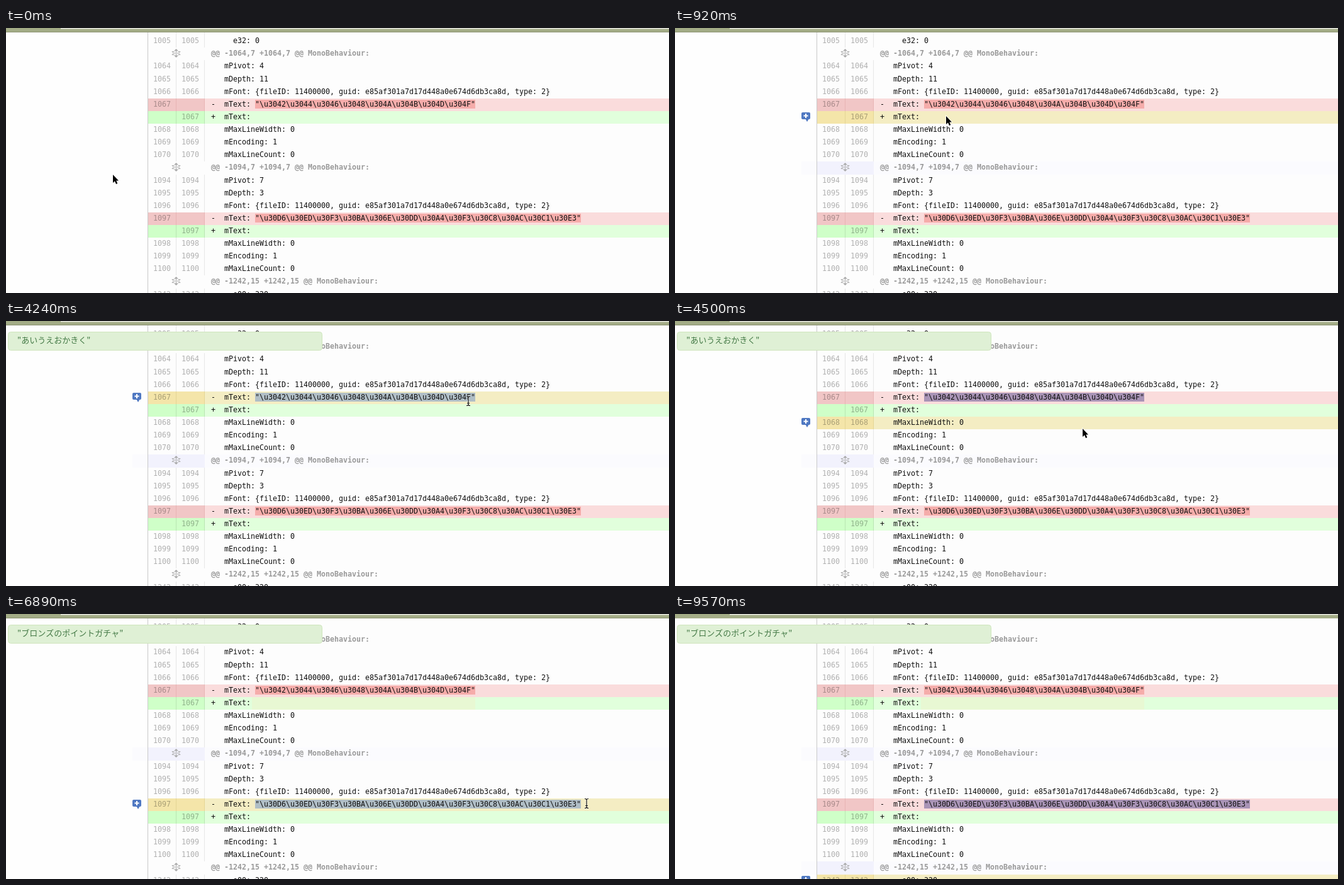
These frames come from a looping animation (1054x421 px, 9660 ms). An HTML page with a canvas:

```html
<!DOCTYPE html>
<html lang="en">
<head>
<meta charset="utf-8">
<title>Escaped text in a diff</title>
<style>
  html, body { margin: 0; width: 100%; height: 100%; overflow: hidden; background: #fdfdfd; }
  canvas { display: block; }
</style>
</head>
<body>
<canvas id="stage" width="1054" height="421"></canvas>
<script>
const ctx = document.getElementById('stage').getContext('2d');
const LOOP = 9660, WIDTH = 1054, HEIGHT = 421;
const CHAR = 7, PITCH = 20.12, FIRST_TOP = 11.2;
const CODE_X = 326, QUOTE_X = 396;
const MONO = '11.63px "DejaVu Sans Mono", monospace';
const FONT_LINE = 'mFont: {fileID: 11400000, guid: e85af301a7d17d448a0e674d6db3ca8d, type: 2}';

const escapeAll = codes => '"' + codes.split(' ').map(code => '\\u' + code).join('') + '"';
const line = (number, text, indent = 3) => ({ kind: 'same', number, text: ' '.repeat(indent) + text });
const hunk = (range, tintAt = Infinity) => ({ kind: 'hunk', text: `@@ ${range} @@ MonoBehaviour:`, tintAt });

// Seven lines of context around one changed text property
const block = (number, pivot, depth, codes) => [
  line(number, 'mPivot: ' + pivot),
  line(number + 1, 'mDepth: ' + depth),
  line(number + 2, FONT_LINE),
  { kind: 'del', number: number + 3, text: '-  mText: ' + escapeAll(codes) },
  { kind: 'add', number: number + 3, text: '+  mText:' },
  line(number + 4, 'mMaxLineWidth: 0'),
  line(number + 5, 'mEncoding: 1'),
  line(number + 6, 'mMaxLineCount: 0')
];

const rows = [
  line(1005, 'e32: 0', 5),
  hunk('-1064,7 +1064,7'),
  ...block(1064, 4, 11, '3042 3044 3046 3048 304A 304B 304D 304F'),
  hunk('-1094,7 +1094,7', 470),
  ...block(1094, 7, 3, '30D6 30ED 30F3 30BA 306E 30DD 30A4 30F3 30C8 30AC 30C1 30E3'),
  hunk('-1242,15 +1242,15', 8850),
  line(1242, 'e00: 320', 5)
];

const palette = {
  del: { gutter: '#f1c6c6', code: '#fadcdc', rule: '#e8b4b4' },
  add: { gutter: '#cfffc8', code: '#e1ffdc', rule: '#b9e6b2' },
  hover: { gutter: '#f4e5a9', code: '#f4edc3', rule: '#e4d595' },
  same: { gutter: '#fdfdfd', code: '#fdfdfd', rule: '#e6e6e6' }
};

// Pointer moves: start, time of last step, step count, points as [step, x, y]
const moves = [
  [120, 470, 5, [[1, 240, 294], [3, 375, 262], [5, 435, 225]]],
  [650, 1280, 8, [[4, 431, 140], [8, 396, 121]]],
  [1640, 2450, 10, [[2, 520, 121], [4, 632, 121], [6, 664, 120], [10, 741, 121]]],
  [2630, 2720, 2, [[2, 745, 121]]],
  [4240, 5130, 11, [[1, 735, 127], [5, 560, 215], [9, 404, 300], [11, 398, 301]]],
  [5210, 5210, 1, [[1, 394, 301]]],
  [5390, 6350, 12, [[3, 560, 302], [7, 800, 302], [11, 915, 301], [12, 923, 301]]],
  [8600, 9030, 6, [[1, 915, 310], [6, 830, 425]]]
];

const selections = [
  { row: 5, start: 1640, frozen: 2800, end: 5390 },
  { row: 14, start: 5390, frozen: 6500, end: LOOP }
];

function pointerAt(t) {
  let pos = [170, 233];
  for (const [start, end, count, points] of moves) {
    if (t < start) break;
    const interval = (end - start) / (count - 1) || 1;
    const step = Math.min(count, Math.floor((t - start) / interval + 0.05) + 1);
    let from = [0, ...pos];
    for (const to of points) {
      const p = Math.min(1, (step - from[0]) / (to[0] - from[0]));
      pos = [1, 2].map(i => from[i] + (to[i] - from[i]) * p);
      if (step <= to[0]) break;
      from = to;
    }
  }
  return pos.map(Math.round);
}

const rowTop = i => Math.round(FIRST_TOP + PITCH * i);

function rect(color, x, y, w, h) {
  ctx.fillStyle = color;
  ctx.fillRect(x, y, w, h);
}

function label(text, x, y, color, font = MONO) {
  ctx.font = font;
  ctx.fillStyle = color;
  ctx.fillText(text, x, y);
}

function stroke(path, color, width) {
  ctx.strokeStyle = color;
  ctx.lineWidth = width;
  ctx.stroke(new Path2D(path));
}

function at(x, y, draw) {
  ctx.save();
  ctx.translate(x, y);
  draw();
  ctx.restore();
}

function drawUnfold() {
  ctx.fillStyle = '#aaa';
  ctx.fill(new Path2D('M0-7 3.5-3.5H-3.5Z M0 7 3.5 3.5H-3.5Z'));
  stroke('M0-4V-1 M0 4V1 M-3-2.5H-6.5L-4 0-6.5 2.5H-3 M3-2.5H6.5L4 0 6.5 2.5H3 M-4 0H4', '#aaa', 1);
}

function drawCommentButton() {
  ctx.fillStyle = '#4f78c2';
  ctx.beginPath();
  ctx.roundRect(-7, -7, 14, 11, 2);
  ctx.fill();
  ctx.fill(new Path2D('M-1 3H5L2 8Z'));
  stroke('M0-5V2 M-3.5-1.5H3.5', '#fff', 2);
}

function drawArrow() {
  const arrow = 'M0 0V13L3 10.2 5 15 7.3 14 5.3 9.5H9Z';
  stroke(arrow, '#fff', 1.5);
  ctx.fillStyle = '#000';
  ctx.fill(new Path2D(arrow));
}

function drawBeam() {
  const beam = 'M-3-7.5Q0-7.5 0-5.5Q0-7.5 3-7.5 M0-6V6 M-3 7.5Q0 7.5 0 5.5Q0 7.5 3 7.5 M-2 3.5H2';
  stroke(beam, 'rgba(255,255,255,.55)', 3);
  stroke(beam, '#111', 1.2);
}

function drawSelection(i, t, hovered) {
  const top = rowTop(i) + 2, height = 14;
  const length = rows[i].text.length - 10;
  if (!hovered) rect('#f5acaa', QUOTE_X, top, length * CHAR, height);
  const selection = selections.find(s => s.row === i && t >= s.start && t < s.end);
  if (!selection) return;
  // The highlight trails the pointer by one step
  const x = pointerAt(Math.min(t, selection.frozen) - 90)[0];
  const chars = Math.max(0, Math.min(length, Math.round((x - QUOTE_X) / CHAR)));
  rect(hovered ? '#b0bec6' : '#a994b6', QUOTE_X, top, chars * CHAR, height);
}

function drawRow(row, i, t, hovered) {
  const top = rowTop(i), height = rowTop(i + 1) - top, baseline = top + 13;
  if (row.kind === 'hunk') {
    if (t >= row.tintAt) {
      rect('#fbfbfe', 201, top, WIDTH - 201, height);
      rect('#f2f2fd', 226, top, 90, height);
    }
    at(270.5, top + 9, drawUnfold);
    label(row.text, CODE_X, baseline, '#999', 'bold ' + MONO);
  } else {
    const colors = palette[hovered ? 'hover' : row.kind];
    rect(colors.gutter, 226, top, 90, height);
    rect(colors.code, 316, top, WIDTH - 316, height);
    rect(colors.rule, 270, top, 1, height);
    rect(colors.rule, 315, top, 1, height);
    if (i === 6 && t >= 5390 && !hovered) rect('#e8f8d3', 391, top, 355, height);
    if (row.kind === 'del') drawSelection(i, t, hovered);
    if (row.kind !== 'add') label(row.number, 234, baseline, 'rgba(0,0,0,.3)');
    if (row.kind !== 'del') label(row.number, 279, baseline, 'rgba(0,0,0,.3)');
    label(row.text, CODE_X, baseline, '#111');
    if (hovered) at(208, top + 9, drawCommentButton);
  }
  rect('#c9c9c9', 225, top, 1, height);
}

function drawHeader(t) {
  rect('#a3ac86', 0, 0, WIDTH, 6);
  rect('#eceee2', 87, 0, WIDTH - 87, 1);
  rect('#c8ccb8', 87, 1, WIDTH - 87, 1);
  rect(t >= 9570 ? '#a9b18f' : '#8d9474', 0, 6, WIDTH, 1);
}

function drawPopup(t) {
  if (t < 3070) return;
  ctx.beginPath();
  ctx.roundRect(3.5, 17.5, 499, 29, 4);
  ctx.fillStyle = '#dff0d5';
  ctx.fill();
  ctx.strokeStyle = '#cfe5bd';
  ctx.lineWidth = 1;
  ctx.stroke();
  const text = t < 6890 ? '"あいうえおかきく"' : '"ブロンズのポイントガチャ"';
  label(text, 18, 35, '#457a47', '500 13px "Noto Sans CJK JP", "Noto Sans CJK", sans-serif');
}

function draw(t) {
  const [x, y] = pointerAt(t);
  const current = x >= 226 ? Math.floor((y - FIRST_TOP) / PITCH) : -1;
  rect('#fefefe', 0, 0, WIDTH, HEIGHT);
  rect('#fdfdfd', 226, 0, WIDTH - 226, HEIGHT);
  rect('#c9c9c9', 225, 7, 1, 5);
  rect('#e6e6e6', 270, 7, 1, 5);
  rect('#e6e6e6', 315, 7, 1, 5);
  rows.forEach((row, i) => drawRow(row, i, t, i === current));
  drawHeader(t);
  drawPopup(t);
  const row = rows[current];
  const overText = row && x > CODE_X && x < CODE_X + row.text.length * CHAR + 12;
  at(x, y, overText ? drawBeam : drawArrow);
}

function tick() {
  draw(performance.now() % LOOP);
  requestAnimationFrame(tick);
}
tick();
</script>
</body>
</html>
```
